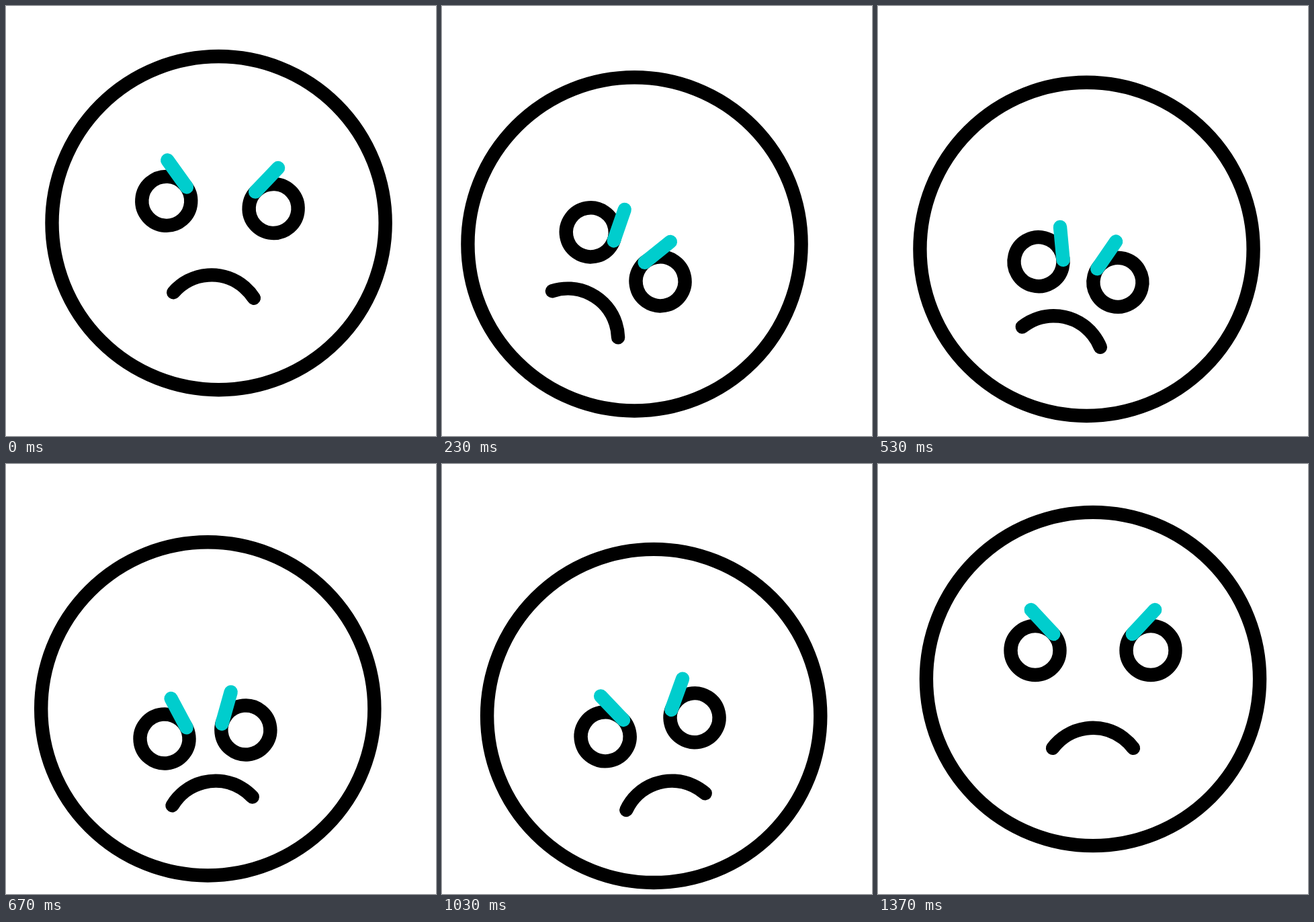
Recreate the animation shown at these times as an HTML page with a canvas. Size 640 px wide and 640 px high, loop 1.67 s.

```html
<!DOCTYPE html>
<html lang="en">
<head>
<meta charset="utf-8">
<title>Angry face</title>
<style>
  html, body { margin: 0; width: 100%; height: 100%; overflow: hidden; background: #fff; }
  canvas { display: block; width: 640px; height: 640px; }
</style>
</head>
<body>
<canvas id="stage" width="640" height="640"></canvas>
<script>
const ctx = document.getElementById('stage').getContext('2d');
const LOOP = 1670, STEP = 100 / 3, REST = 41;
const FIRST_TURN = 7.9, HALF_SWING = 5.15, LEAD = 1.4;
const STROKE = 20.4, BLACK = '#000', TEAL = '#00cdcd';

const clamp = (v, low, high) => Math.min(high, Math.max(low, v));
const radians = degrees => degrees * Math.PI / 180;

function ease(step, from, to) {
  const u = clamp((step - from) / (to - from), 0, 1);
  return u * u * (3 - 2 * u);
}

// Side-to-side shake: 1 is fully left, -1 fully right; five half swings.
const swing = step => Math.cos(Math.PI * clamp((step - FIRST_TURN) / HALF_SWING, 0, 5));

// Head moves in steps of 1/30 s; the tilt runs slightly ahead of the sideways move.
function poseAt(step) {
  if (step >= REST) step = REST;
  const rise = ease(step, -2, FIRST_TURN);
  const calm = ease(step, 7, 16);
  const relax = 1 - ease(step, 28, 36.5);
  const back = from => 1 - ease(step, from, REST);
  const sink = tau => (1 - Math.exp(-(step + 1) / tau)) * relax;
  const since = step - 7;

  const shift = -12.5 * ease(step, 10, 27) * relax;
  return {
    shift,
    x: shift / 3 - (34.3 + 0.25 * since) * swing(step) * rise * back(33 + LEAD),
    y: (35.2 + 0.83 * since - 3.5 * swing(step) * calm) * rise * back(33),
    tilt: (37.7 - 21.2 * calm) * swing(step + LEAD) * rise * back(33),
    eyeDrop: 81 * sink(4.8),
    eyeGap: 86 - 25.3 * sink(3.6),
    mouthDrop: 36.5 * sink(7),
    brow: 27.5 * (1 - 0.018 * since) * rise * relax
  };
}

function arc(x, y, radius, from = 0, to = 2 * Math.PI) {
  ctx.strokeStyle = BLACK;
  ctx.beginPath();
  ctx.arc(x, y, radius, from, to);
  ctx.stroke();
}

// The brow swings around the centre of its eye; side -1 is left, 1 is right.
function eye(side, gap, y, browAngle) {
  ctx.save();
  ctx.translate(side * gap, y);
  ctx.scale(-side, 1);
  arc(0, 0, 36.5);
  ctx.rotate(radians(browAngle));
  ctx.strokeStyle = TEAL;
  ctx.beginPath();
  ctx.moveTo(-6.2, -60.5);
  ctx.lineTo(27.3, -24.5);
  ctx.stroke();
  ctx.restore();
}

function mouth(y) {
  const radius = 75, half = Math.asin(60 / radius), up = -Math.PI / 2;
  arc(0, y + radius * Math.cos(half), radius, up - half, up + half);
}

function draw(step) {
  const pose = poseAt(step);
  ctx.fillStyle = '#fff';
  ctx.fillRect(0, 0, 640, 640);
  ctx.lineWidth = STROKE;
  ctx.lineCap = 'round';
  ctx.save();
  ctx.translate(320 + pose.x, 320 + pose.y);
  arc(0, 0, 248.1);
  ctx.rotate(radians(pose.tilt));
  ctx.translate(pose.shift, 0);
  for (const side of [-1, 1]) eye(side, pose.eyeGap, pose.eyeDrop - 42.5, pose.brow);
  mouth(102.8 + pose.mouthDrop);
  ctx.restore();
}

const start = performance.now();
function tick() {
  const time = (performance.now() - start) % LOOP;
  draw(Math.floor((time + 4) / STEP));
  requestAnimationFrame(tick);
}
tick();
</script>
</body>
</html>
```
